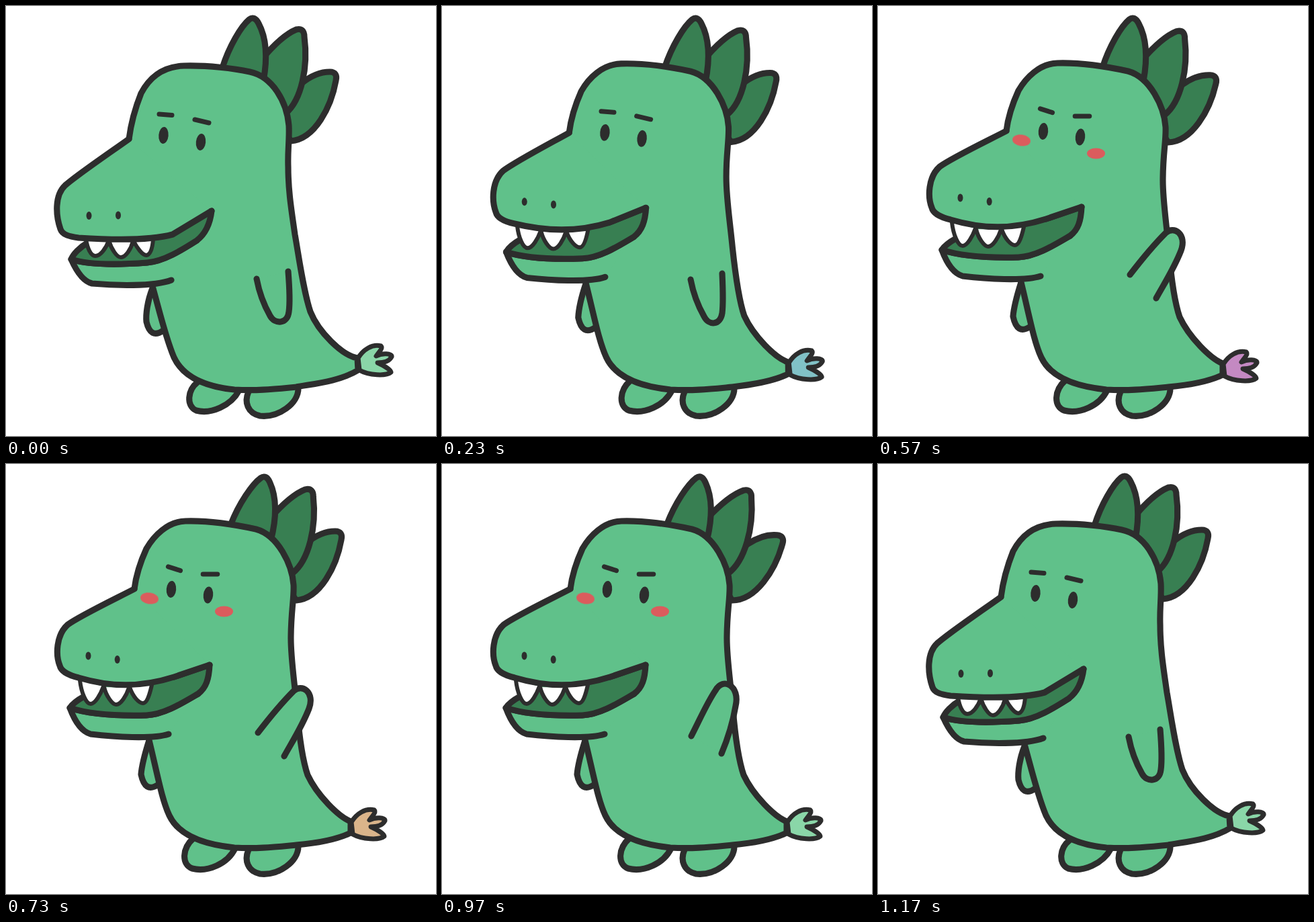
An HTML page for the animation above (1.43 s loop, 640 by 640 pixels).

```html
<!DOCTYPE html>
<html lang="en">
<head>
<meta charset="utf-8">
<title>Waving dino</title>
<style>
  html, body { margin: 0; width: 100%; height: 100%; overflow: hidden; background: #fff; }
  svg { display: block; width: 100vw; height: 100vh; }

  svg * {
    animation: 1430ms ease-in-out infinite;
  }
  .line { fill: #60c18a; stroke: #2d2d2d; stroke-width: 9.1; stroke-linecap: round; stroke-linejoin: round; }
  .dark { fill: #387f52; }
  .teeth { fill: #fff; stroke-width: 6; }
  .ink { fill: #2d2d2d; }
  .brow { stroke-width: 7; transform-box: fill-box; transform-origin: center; }

  .morph { d: var(--a); animation-name: morph; }
  .arm { d: var(--a); animation-name: arm; }
  .shift { animation-name: shift; }
  .eye { animation-name: look; }
  .brow { animation-name: look, tilt; }
  .leaf1 { animation-name: shift, leaf1; transform-origin: 354px 100px; }
  .leaf2 { animation-name: shift, leaf2; transform-origin: 400px 140px; }
  .leaf3 { animation-name: shift, leaf3; transform-origin: 424px 195px; }
  .tuft { stroke-width: 7; animation-name: shift, hue; animation-timing-function: ease-in-out, linear; }
  .blush { fill: #db5c5d; opacity: 0; animation-name: blush; animation-timing-function: linear; }

  @keyframes morph {
    0%, 2%, 81.7%, 100% { d: var(--a); }
    23%, 69% { d: var(--b); }
  }
  @keyframes shift {
    0%, 2%, 81.7%, 100% { translate: 0 0; }
    23%, 69% { translate: var(--x) var(--y); }
  }
  @keyframes look {
    0%, 2%, 81.7%, 100% { translate: 0 0; }
    25%, 69% { translate: var(--x) var(--y); }
  }
  @keyframes tilt {
    0%, 20%, 81%, 100% { rotate: 0deg; }
    32%, 69% { rotate: var(--r); }
  }
  @keyframes leaf1 {
    0%, 13%, 39.8%, 77%, 100% { rotate: 0deg; }
    26%, 59.5% { rotate: 6deg; }
  }
  @keyframes leaf2 {
    0%, 16%, 45.5%, 78%, 100% { rotate: 0deg; }
    27%, 61% { rotate: 5.2deg; }
  }
  @keyframes leaf3 {
    0%, 16%, 51%, 79%, 100% { rotate: 0deg; }
    28%, 66% { rotate: 5.6deg; }
  }
  @keyframes hue {
    0%, 9%, 67.8%, 100% { fill: #8ad6a8; }
    26% { fill: #74a3f0; }
    44% { fill: #dc82b4; }
    56% { fill: #d9d76e; }
  }
  @keyframes blush {
    0%, 21%, 78%, 100% { opacity: 0; }
    31%, 69% { opacity: 1; }
  }
  @keyframes arm {
    0%, 2%, 81.7%, 100% { d: var(--a); }
    16% { d: var(--b); }
    26%, 74% { d: var(--side); }
    34.3%, 45.5%, 56.6%, 67.8% { d: var(--in); }
    39.9%, 51%, 62.2% { d: var(--out); }
  }
</style>
</head>
<body>
<svg viewBox="0 0 640 640">
  <!-- far arm and feet -->
  <path class="line morph" style="
    --a:path('M218 420C210 440 208 460 209 470C213 487 221 492 234 483');
    --b:path('M213 411C207 430 202 450 201 462C205 481 213 486 227 477')"/>
  <path class="line morph" style="
    --a:path('M285 560C270 572 268 595 283 602C305 608 335 595 347 572');
    --b:path('M279 557C262 572 261 596 277 602C300 608 330 595 341 572')"/>
  <path class="line" d="M361 574C354 590 360 606 378 610C405 613 436 592 435 568"/>

  <!-- crest -->
  <path class="line dark leaf3" style="--x:8px;--y:2px"
    d="M440 115C455 103 470 98 482 98C490 98 493 103 491 111C484 150 460 198 424 201L396 160Z"/>
  <path class="line dark leaf2" style="--x:11px;--y:2px"
    d="M380 80C395 62 415 42 432 35C440 33 444 37 444 46C450 90 440 140 416 160L370 130Z"/>
  <path class="line dark leaf1" style="--x:12px;--y:0px"
    d="M322 92C332 60 350 30 362 20C367 16 372 18 376 26C390 52 388 85 383 112"/>

  <!-- body -->
  <path class="line morph" style="
    --a:path('M183 198C186 175 193 150 201 130C213 107 233 90 265 89C300 88 340 93 363 98C397 105 418 143 421 178C422 200 419 215 420 240C420 275 425 305 430 340C437 380 443 425 453 455C465 485 500 520 523 524L524 542C495 560 450 563 432 567C400 570 375 573 340 571C300 567 265 555 250 523C238 495 230 460 218 417');
    --b:path('M191 186C193 170 198 150 209 126C220 107 240 86 267 85C300 84 340 90 372 97C405 106 426 150 428 180C429 200 424 220 424 260C424 290 429 320 433 365C436 400 441 440 449 463C463 493 495 525 513 532L513 549C490 560 455 565 432 567C400 570 375 573 340 571C300 567 258 555 243 523C232 500 225 460 213 411')"/>
  <path class="line tuft" style="--x:-10px;--y:9px"
    d="M524 524C532 511 545 503 558 506C561 509 557 513 551 521C560 516 575 517 574 522C570 530 560 531 553 531C562 535 572 541 573 545C566 551 540 550 526 542Z"/>

  <!-- jaw, mouth, teeth, muzzle -->
  <path class="line morph" style="
    --a:path('M284 349C262 363 235 380 210 382C170 385 125 386 97 377C105 395 115 410 128 413C160 416 220 418 246 408');
    --b:path('M286 342C262 356 235 373 209 374C170 375 125 373 95 363C102 382 112 398 126 402C160 406 218 410 242 402')"/>
  <path class="line dark morph" style="
    --a:path('M306 305C304 322 297 339 284 349C262 363 235 380 210 382C170 385 125 386 97 377C100 369 110 359 122 352L126 345L248 339Z');
    --b:path('M303 299C302 320 298 333 286 342C262 356 235 373 209 374C170 375 125 373 95 363C99 357 107 351 116 346L120 322L250 317Z')"/>
  <path class="line teeth morph" style="
    --a:path('M119 347C121 360 126 372 133 372C141 372 149 360 153 349M153 349C157 362 165 374 171 374C178 374 186 362 189 350M190 350C195 360 203 371 209 371C215 370 218 360 219 347');
    --b:path('M110 322C112 340 119 357 126 357C133 357 141 342 145 331M146 332C149 345 158 358 164 358C171 358 179 345 183 333M184 332C189 347 198 356 204 356C210 356 214 342 217 329')"/>
  <path class="line morph" style="
    --a:path('M183 198C155 218 105 252 88 267C72 282 74 312 81 332C84 341 95 343 108 345C155 348 212 350 248 340L306 305');
    --b:path('M191 186C160 202 110 226 92 239C74 255 74 285 80 300C82 309 95 315 108 318C155 332 200 333 250 317L303 299')"/>

  <!-- face -->
  <ellipse class="ink shift" style="--x:-1px;--y:-26.5px" cx="123.5" cy="312" rx="4" ry="6"/>
  <ellipse class="ink shift" style="--x:-1.3px;--y:-20.5px" cx="167" cy="311.5" rx="4" ry="6"/>
  <ellipse class="ink eye" style="--x:11.5px;--y:-6px" cx="234.5" cy="192.5" rx="7.2" ry="12.5" transform="rotate(5 234.5 192.5)"/>
  <ellipse class="ink eye" style="--x:11px;--y:-7.5px" cx="290" cy="202.5" rx="7.2" ry="12.5" transform="rotate(6 290 202.5)"/>
  <path class="line brow" style="--x:13px;--y:-6px;--r:13deg" d="M228 161L247 162.5"/>
  <path class="line brow" style="--x:12.5px;--y:-7.5px;--r:-13deg" d="M281 169L302 174"/>
  <ellipse class="blush" cx="213.5" cy="200" rx="13.5" ry="8.5" transform="rotate(8 213.5 200)"/>
  <ellipse class="blush" cx="324.5" cy="219.5" rx="13.5" ry="8"/>

  <!-- waving arm -->
  <path class="line arm" style="
    --a:path('M373 406C377 427 385 447 393 461C400 474 419 474 421 455C423 440 422 420 420 395');
    --b:path('M370 407C374 428 382 448 390 462C397 476 414 476 417 457C419 440 418 420 417 398');
    --side:path('M403 448C430 447 455 442 472 437C490 432 486 413 468 403C455 397 430 397 402 398');
    --out:path('M414 435C425 415 441 390 451 364C460 340 441 326 428 338C412 354 395 374 375 400');
    --in:path('M416 431C424 412 432 390 437 360C444 330 418 316 407 337C394 356 383 382 371 405')"/>
</svg>
</body>
</html>
```
